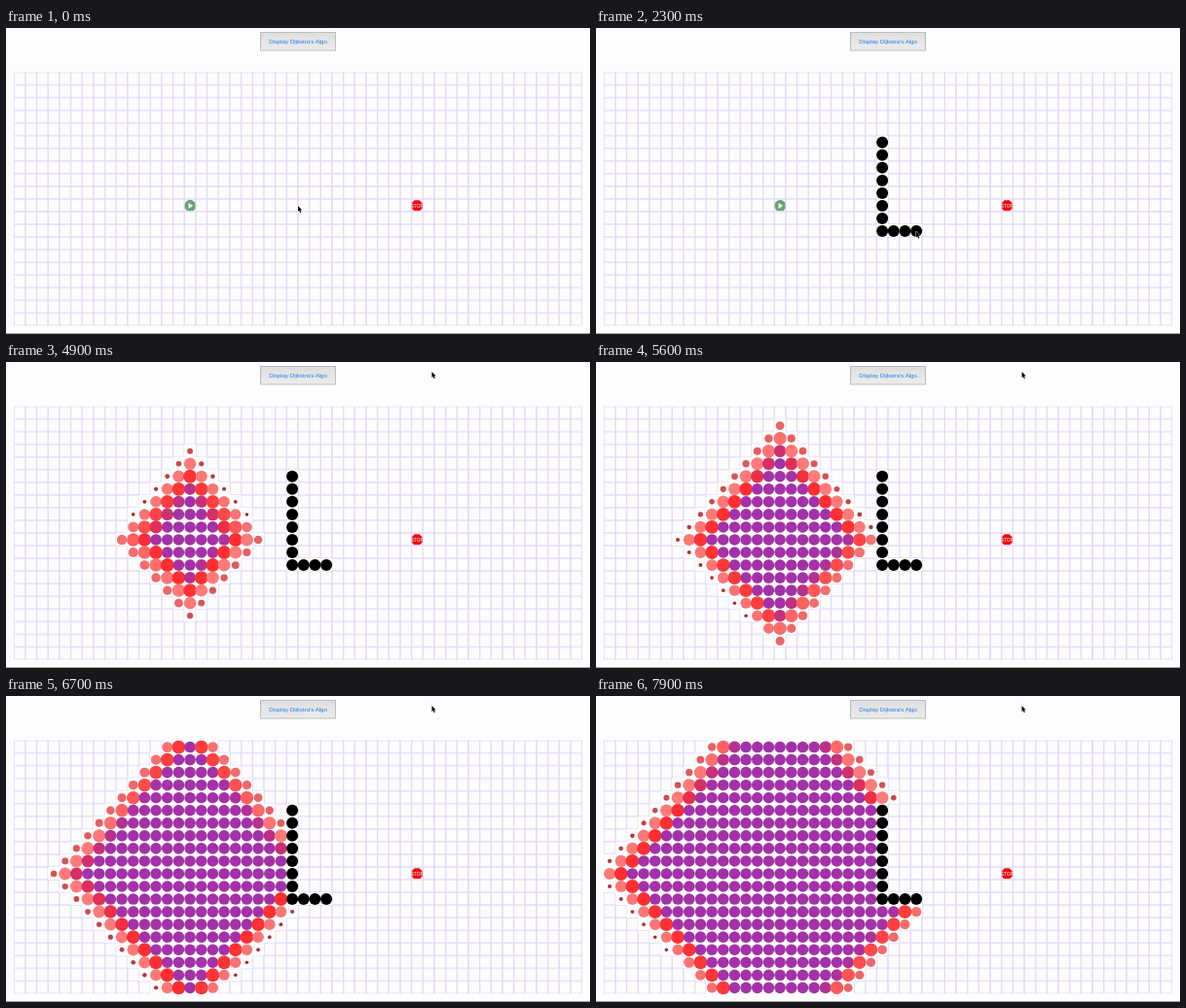
Animation, 600 px wide and 315 px high, one loop 8000 ms. Source, as an HTML page with a canvas:

```html
<!DOCTYPE html>
<html lang="en">
<head>
<meta charset="utf-8">
<title>Dijkstra grid</title>
<style>
  html, body { margin: 0; width: 100%; height: 100%; overflow: hidden; background: #fdfdfd; }
  svg, canvas { position: absolute; left: 0; top: 0; width: 600px; height: 315px; display: block; }
  text { font-family: "Liberation Sans", Arial, sans-serif; text-anchor: middle; }
</style>
</head>
<body>
<svg viewBox="0 0 600 315">
  <defs>
    <linearGradient id="face" x2="0" y2="1">
      <stop offset="0" stop-color="#dedede"/>
      <stop offset="1" stop-color="#ececec"/>
    </linearGradient>
  </defs>
  <rect x="261.5" y="4.5" width="77" height="18.5" fill="url(#face)" stroke="#bcbcbc"/>
  <text x="300" y="16" font-size="6.1" fill="#1f7fe8">Display Dijkstra's Algo</text>
  <rect y="314" width="600" height="1" fill="#a8a8a8"/>
  <g transform="translate(189.2 183)">
    <circle r="5.6" fill="#62a86c" stroke="#7d8f80" stroke-width=".9"/>
    <path d="M-1.7-3 3 0-1.7 3z" fill="#fff"/>
  </g>
  <g transform="translate(422.2 183)">
    <path d="M-2.4-5.8H2.4L5.8-2.4V2.4L2.4 5.8H-2.4L-5.8 2.4V-2.4z" fill="#f00c0c"/>
    <text y="1.8" font-size="4.8" fill="#fff">STOP</text>
  </g>
</svg>
<canvas id="stage"></canvas>
<script>
const LOOP = 8000, COLS = 50, ROWS = 20;
const LEFT = 8.2, TOP = 45.6, CW = 11.67, CH = 13.04;
const POP = 1000, RADIUS = 5.8;

const canvas = document.getElementById('stage');
const ctx = canvas.getContext('2d');
const dpr = window.devicePixelRatio || 1;
canvas.width = 600 * dpr;
canvas.height = 315 * dpr;

const key = (c, r) => r * COLS + c;
const mix = (a, b, k) => a + (b - a) * k;

// Keys are [position, value, value, ...]; curve shapes each segment
function along(keys, x, curve = k => k) {
  let i = 1;
  while (i < keys.length - 1 && keys[i][0] < x) i++;
  const [from, ...a] = keys[i - 1], [to, ...b] = keys[i];
  const k = curve((x - from) / (to - from));
  return a.map((v, n) => mix(v, b[n], k));
}

// CSS "ease": cubic-bezier(.25, .1, .25, 1)
function ease(x) {
  if (x <= 0 || x >= 1) return Math.min(1, Math.max(0, x));
  let lo = 0, hi = 1, s;
  for (let i = 0; i < 14; i++) {
    s = (lo + hi) / 2;
    if (.75 * s * (1 - s) + s ** 3 < x) lo = s; else hi = s;
  }
  return .3 * s * (1 - s) ** 2 + 3 * s * s * (1 - s) + s ** 3;
}

// Walls: down column 24, then right along row 12
const walls = new Map();
for (let r = 5; r <= 12; r++) walls.set(key(24, r), 1000 + (r - 5) * 100);
for (let c = 25; c <= 27; c++) walls.set(key(c, 12), 1900 + (c - 25) * 130);

// Number of cells visited -> time
const pace = [[0, 3730], [97, 4920], [338, 7220], [404, 7920]];

function search() {
  const born = new Map(), queue = [[15, 10]], seen = new Set([key(15, 10)]);
  queue.forEach(([c, r], i) => {
    born.set(key(c, r), along(pace, i)[0]);
    for (const [dx, dy] of [[0, -1], [-1, 0], [1, 0], [0, 1]]) {
      const x = c + dx, y = r + dy, id = key(x, y);
      if (x < 0 || y < 0 || x >= COLS || y >= ROWS || seen.has(id) || walls.has(id)) continue;
      seen.add(id);
      queue.push([x, y]);
    }
  });
  return born;
}

// forEach skips items appended later, so the queue needs an index loop
function visitTimes() {
  const born = new Map(), queue = [[15, 10]], seen = new Set([key(15, 10)]);
  for (let i = 0; i < queue.length; i++) {
    const [c, r] = queue[i];
    born.set(key(c, r), along(pace, i)[0]);
    for (const [dx, dy] of [[0, -1], [-1, 0], [1, 0], [0, 1]]) {
      const x = c + dx, y = r + dy, id = key(x, y);
      if (x < 0 || y < 0 || x >= COLS || y >= ROWS || seen.has(id) || walls.has(id)) continue;
      seen.add(id);
      queue.push([x, y]);
    }
  }
  return born;
}
const born = visitTimes();

const sizes = [[0, .3], [.75, 1.2], [1, 1]];
const shades = [[0, 166, 40, 48], [.5, 255, 122, 122], [.75, 255, 46, 48], [1, 163, 49, 168]];

function dot(c, r, radius, color) {
  ctx.fillStyle = color;
  ctx.beginPath();
  ctx.arc(LEFT + (c + .5) * CW, TOP + (r + .5) * CH + .45, radius, 0, 7);
  ctx.fill();
}

function visitedDot(c, r, age) {
  const p = Math.min(1, age / POP);
  const color = along(shades, p, ease).map(Math.round);
  dot(c, r, RADIUS * along(sizes, p, ease)[0], `rgb(${color})`);
}

function cellBorder(c, r) {
  const x = LEFT + c * CW, y = TOP + r * CH;
  ctx.fillStyle = '#e9defc';
  ctx.fillRect(x, y, CW, .9);
  ctx.fillRect(x, y + CH - .9, CW, .9);
  ctx.fillStyle = '#dfd0f8';
  ctx.fillRect(x, y, .65, CH);
  ctx.fillRect(x + CW - .65, y, .65, CH);
}

function clearCell(c, r) {
  ctx.fillStyle = '#fdfdfd';
  ctx.fillRect(LEFT + c * CW, TOP + r * CH, CW, CH);
}

const route = [
  [100, 300, 183], [400, 328, 204], [900, 295, 124], [1700, 295, 209], [2250, 329, 209.5],
  [2800, 329, 209.5], [3500, 301, 17], [4150, 301, 17], [4450, 437.5, 10]
];
const arrow = new Path2D('M0 0V6L1.3 4.9 2.3 7.2 3.3 6.8 2.4 4.5 4.2 4.4Z');

function pointer(t) {
  const [first, last] = [route[0][0], route[route.length - 1][0]];
  ctx.save();
  ctx.translate(...along(route, Math.min(last, Math.max(first, t))));
  ctx.strokeStyle = '#fff';
  ctx.lineWidth = .9;
  ctx.stroke(arrow);
  ctx.fillStyle = '#000';
  ctx.fill(arrow);
  ctx.restore();
}

function eachCell(visit) {
  for (let r = 0; r < ROWS; r++) {
    for (let c = 0; c < COLS; c++) visit(c, r, key(c, r));
  }
}

function draw(t) {
  ctx.setTransform(dpr, 0, 0, dpr, 0, 0);
  ctx.clearRect(0, 0, 600, 315);
  eachCell((c, r, id) => {
    if (t >= born.get(id)) clearCell(c, r);
    else if (!(t >= walls.get(id))) cellBorder(c, r);
  });
  eachCell((c, r, id) => {
    if (t >= walls.get(id)) dot(c, r, 6, '#000');
    else if (t >= born.get(id)) visitedDot(c, r, t - born.get(id));
  });
  pointer(t);
}

function frame() {
  draw(performance.now() % LOOP);
  requestAnimationFrame(frame);
}
frame();
</script>
</body>
</html>
```
